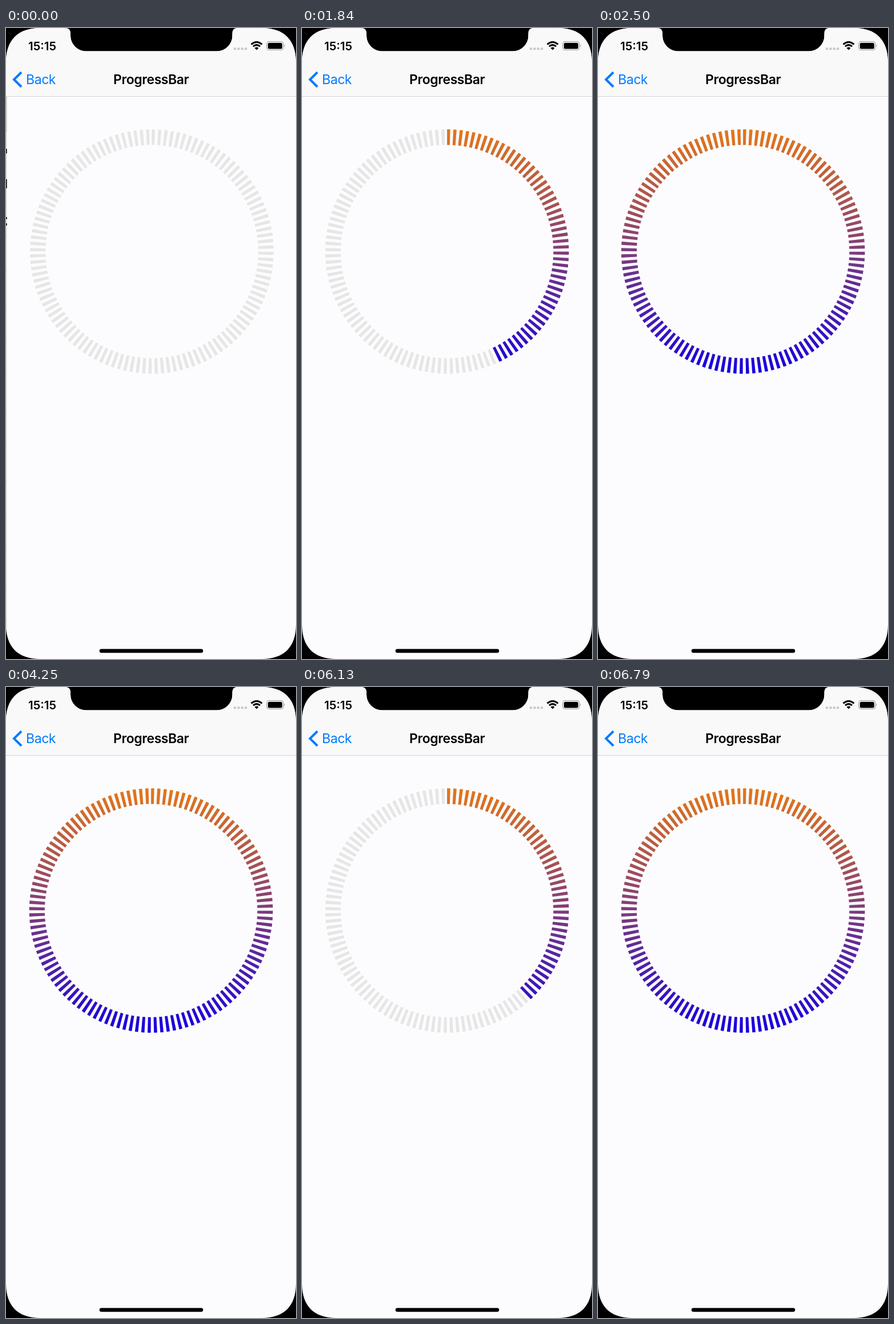
Write an HTML page that moves like this. It is 508 by 1102 pixels and loops after 6830 ms.

```html
<!DOCTYPE html>
<html lang="en">
<head>
<meta charset="utf-8">
<title>ProgressBar</title>
<style>
  html, body { margin: 0; width: 100%; height: 100%; overflow: hidden; background: #000; }
  svg { display: block; width: 100vw; height: 100vh; }
  text { font-family: Inter, Roboto, sans-serif; font-size: 23px; letter-spacing: -0.018em; }
  .bold { font-weight: 600; }
  .ring { fill: none; stroke-width: 27.1; }
</style>
</head>
<body>
<svg viewBox="0 0 508 1102">
  <defs>
    <linearGradient id="warmToCool" gradientUnits="userSpaceOnUse" x1="0" y1="177" x2="0" y2="604">
      <stop offset="0" stop-color="#e87615"/>
      <stop offset="1" stop-color="#1400e2"/>
    </linearGradient>
    <clipPath id="screen">
      <path d="M0 60C0 21 21 0 60 0H104Q113 0 113 10V13.5A27 27 0 0 0 140 40.5H369.5A27 27 0 0 0 396.5 13.5V10Q396.5 0 405 0H448C487 0 508 21 508 60V1042C508 1081 487 1102 448 1102H60C21 1102 0 1081 0 1042Z"/>
    </clipPath>
  </defs>

  <g clip-path="url(#screen)">
    <rect width="508" height="1102" fill="#fcfcfe"/>
    <g id="page">
      <path id="track" class="ring" stroke="#e6e6e5"/>
      <path id="progress" class="ring" stroke="url(#warmToCool)"/>
    </g>

    <!-- edge of the previous page, still sliding away -->
    <g id="previousPage">
      <path d="M.7 120V1102" stroke="#dededb" stroke-width="1.4"/>
      <path d="M.7 120V180" stroke="#c6c6c4" stroke-width="1.4"/>
      <path d="M.7 180V1102" stroke="#c4c4c2" stroke-width="1.4" stroke-dasharray="1 60"/>
      <path d="M.8 211V219M.8 264V280M.8 330V334M.8 341V345" stroke="#111" stroke-width="1.6"/>
    </g>

    <rect width="508" height="119.5" fill="#f9f9f9"/>
    <path d="M0 119.5H508" stroke="#d2d2d2"/>

    <text class="bold" x="63.5" y="38.5" text-anchor="middle" style="font-size:20.5px;letter-spacing:0">15:15</text>
    <path d="M27 77.3L14 90L27 102.7" fill="none" stroke="#007aff" stroke-width="4"/>
    <text x="35" y="98" fill="#007aff">Back</text>
    <text class="bold" x="254.2" y="98" text-anchor="middle">ProgressBar</text>

    <path d="M401 36.3H421" stroke="#c8c8ca" stroke-width="4.6" stroke-linecap="round" stroke-dasharray="0 6.4"/>
    <g fill="none" stroke="#000" stroke-width="3.1">
      <path d="M429.6 28.6Q439 20.4 448.4 28.6"/>
      <path d="M433 32.2Q439 27 445 32.2"/>
    </g>
    <path d="M435.6 35Q439 32.2 442.4 35L439 38.5Z"/>
    <rect x="456.7" y="23.9" width="29.2" height="14.6" rx="4" fill="none" stroke="#a0a0a0" stroke-width="1.2"/>
    <rect x="458.8" y="26" width="25" height="10.4" rx="2.2"/>
    <path d="M487.3 28.8Q489.6 31.2 487.3 33.6Z" fill="#a0a0a0"/>

    <rect x="163.7" y="1084.4" width="181.6" height="6.8" rx="3.4"/>
  </g>
</svg>

<script>
const LOOP = 6830, FRAME = 1000 / 24, FILL = 1270;
const FIRST_START = 1249, RESTART = 5578;
const CENTER = { x: 254.1, y: 390.4 }, RADIUS = 199.8, DASHES = 120;
const byId = id => document.getElementById(id);

// Cubic ease-in-out with control points (.42, 0) and (.58, 1).
function easeInOut(x) {
  if (x <= 0) return 0;
  if (x >= 1) return 1;
  let low = 0, high = 1;
  for (let i = 0; i < 20; i++) {
    const u = (low + high) / 2, v = 1 - u;
    if (1.26 * v * v * u + 1.74 * v * u * u + u ** 3 < x) low = u;
    else high = u;
  }
  return low * low * (3 - 2 * low);
}

function arcPath(fraction) {
  const angle = Math.min(fraction, 0.9999) * 2 * Math.PI;
  const x = CENTER.x + RADIUS * Math.sin(angle);
  const y = CENTER.y - RADIUS * Math.cos(angle);
  return `M${CENTER.x} ${CENTER.y - RADIUS}A${RADIUS} ${RADIUS} 0 ${+(fraction > 0.5)} 1 ${x} ${y}`;
}

function draw(now) {
  const time = Math.floor((now % LOOP + 2) / FRAME) * FRAME;
  const start = time >= RESTART ? RESTART : FIRST_START;
  const sliding = time < FRAME - 1;
  byId("page").setAttribute("transform", `translate(${sliding ? 1.4 : 0})`);
  byId("previousPage").setAttribute("visibility", sliding ? "visible" : "hidden");
  byId("progress").setAttribute("d", arcPath(easeInOut((time - start) / FILL)));
}

for (const ring of document.querySelectorAll(".ring")) {
  ring.setAttribute("stroke-dasharray", Math.PI * RADIUS / DASHES);
}
byId("track").setAttribute("d", arcPath(1));
const origin = performance.now();
function tick() {
  draw(performance.now() - origin);
  requestAnimationFrame(tick);
}
tick();
</script>
</body>
</html>
```
